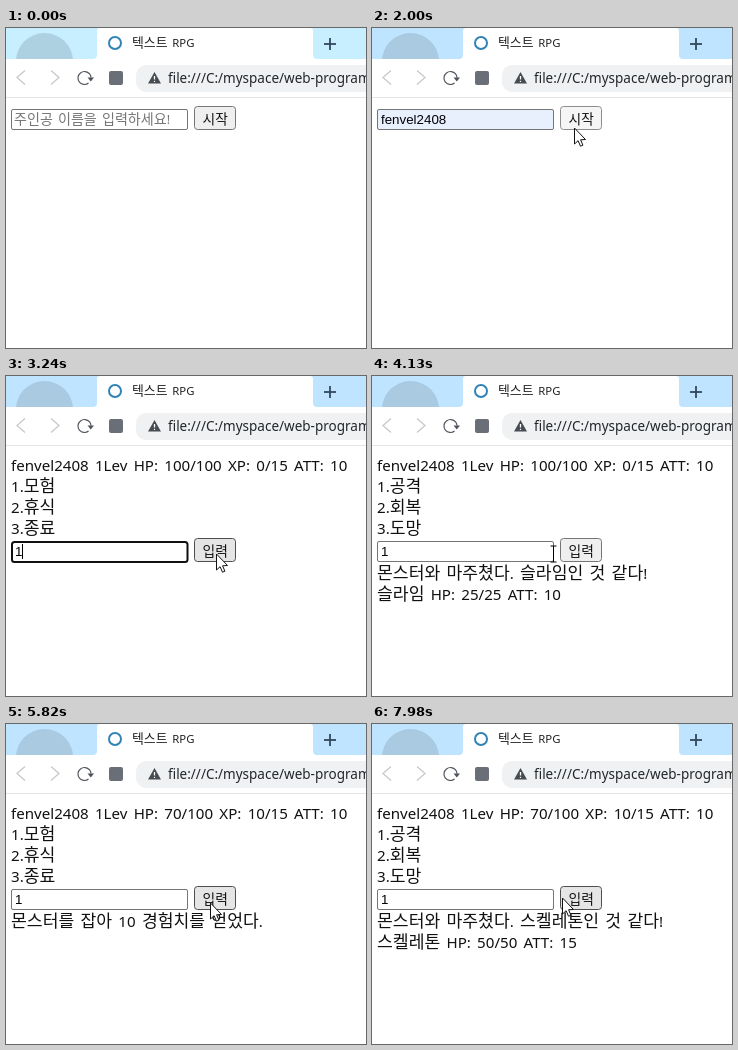
These frames come from a looping animation (360x320 px, 8000 ms). An HTML page with a canvas:

```html
<!DOCTYPE html>
<html lang="ko">
<head>
<meta charset="utf-8">
<title>텍스트 RPG</title>
<style>
  html, body { margin: 0; width: 100%; height: 100%; overflow: hidden; background: #fff; }
  canvas { display: block; }
</style>
</head>
<body>
<canvas id="stage" width="360" height="320"></canvas>
<script>
const ctx = document.getElementById('stage').getContext('2d');
const LOOP = 8000;
const HERO = 'fenvel2408';
const LATIN = '"Noto Sans", "Open Sans", sans-serif';
const KOREAN = '"Noto Sans CJK KR", "Noto Sans CJK JP", "Noto Sans CJK", sans-serif';
const FIELD_FONT = '13.33px "Liberation Sans", Arial, sans-serif';

// Pointer path: time, x, y
const PATH = [
  [210, 150, -20], [480, 95, 90], [700, 95, 90], [960, 91, 116],
  [1150, 100, 128], [1350, 100, 128], [1800, 203, 98], [1900, 202, 99],
  [2220, 202, 99], [2520, 120, 174], [2700, 120, 174], [2970, 216, 176],
  [3200, 210, 177], [3990, 210, 177], [4280, 150, 176], [4480, 150, 176],
  [4750, 204, 178], [7460, 204, 178], [7570, 165, 175], [7800, 165, 175],
  [7970, 190, 173]
];

// Mouse button: down, up
const CLICKS = [
  [480, 600], [1280, 1390], [1870, 2065], [2560, 2660], [3300, 3375],
  [4785, 4945], [5275, 5405], [5685, 5815], [6505, 6635]
];

const CAMP = ['1.모험', '2.휴식', '3.종료'];
const FIGHT = ['1.공격', '2.회복', '3.도망'];
const HIT = '10의 데미지를 주고, 10의 데미지를 받았다.';
const meet = name => `몬스터와 마주쳤다. ${name}인 것 같다!`;
const slime = hp => `슬라임 HP: ${hp}/25 ATT: 10`;

const STATES = [
  { at: 2065, hp: 100, xp: 0, menu: CAMP, log: [] },
  { at: 3375, hp: 100, xp: 0, menu: FIGHT, log: [meet('슬라임'), slime(25)] },
  { at: 4945, hp: 90, xp: 0, menu: FIGHT, log: [HIT, slime(15)] },
  { at: 5405, hp: 80, xp: 0, menu: FIGHT, log: [HIT, slime(5)] },
  { at: 5815, hp: 70, xp: 10, menu: CAMP, log: ['몬스터를 잡아 10 경험치를 얻었다.'] },
  { at: 6635, hp: 70, xp: 10, menu: FIGHT, log: [meet('스켈레톤'), '스켈레톤 HP: 50/50 ATT: 15'] }
];

const within = (t, a, b) => t >= a && t < b;

// Hangul, Latin and spaces are set as separate runs
function text(str, x, y, size, color = '#111') {
  ctx.fillStyle = color;
  for (const run of str.match(/[가-힣]+| |[^가-힣 ]+/g)) {
    if (run === ' ') {
      x += size * 0.39;
      continue;
    }
    const korean = /[가-힣]/.test(run);
    ctx.font = korean ? `${size * 1.075}px ${KOREAN}` : `${size * 0.945}px ${LATIN}`;
    ctx.fillText(run, x, y);
    x += ctx.measureText(run).width;
  }
}

function box(x, y, w, h, r, fill, stroke, line = 1) {
  ctx.beginPath();
  ctx.roundRect(x, y, w, h, r);
  if (fill) { ctx.fillStyle = fill; ctx.fill(); }
  if (stroke) { ctx.strokeStyle = stroke; ctx.lineWidth = line; ctx.stroke(); }
}

function lines(points, color, width) {
  ctx.beginPath();
  points.forEach(([x, y], i) => i ? ctx.lineTo(x, y) : ctx.moveTo(x, y));
  ctx.strokeStyle = color;
  ctx.lineWidth = width;
  ctx.stroke();
}

function polygon(points, fill) {
  ctx.beginPath();
  points.forEach(([x, y]) => ctx.lineTo(x, y));
  ctx.closePath();
  ctx.fillStyle = fill;
  ctx.fill();
}

function disc(x, y, r, fill) {
  ctx.beginPath();
  ctx.arc(x, y, r, 0, Math.PI * 2);
  ctx.fillStyle = fill;
  ctx.fill();
}

function drawBrowser(t) {
  ctx.fillStyle = '#fff';
  ctx.fillRect(0, 0, 360, 320);
  ctx.fillStyle = t < 70 ? '#c8efff' : '#bee4ff';
  ctx.fillRect(0, 0, 360, 31);

  ctx.save();
  ctx.beginPath();
  ctx.rect(0, 0, 360, 31);
  ctx.clip();
  disc(38.5, 33.5, 28.5, t < 70 ? '#aed1e1' : '#a9cae0');
  ctx.restore();

  // Active tab with flared feet
  ctx.beginPath();
  ctx.moveTo(87, 31);
  ctx.quadraticCurveTo(91, 31, 91, 27);
  ctx.lineTo(91, 3);
  ctx.quadraticCurveTo(91, 0, 94, 0);
  ctx.lineTo(304, 0);
  ctx.quadraticCurveTo(307, 0, 307, 3);
  ctx.lineTo(307, 27);
  ctx.quadraticCurveTo(307, 31, 311, 31);
  ctx.fillStyle = '#fff';
  ctx.fill();

  ctx.beginPath();
  ctx.arc(109, 15, 6, 0, Math.PI * 2);
  ctx.strokeStyle = '#2f83b7';
  ctx.lineWidth = 2;
  ctx.stroke();
  text('텍스트 RPG', 126, 19, 12, '#222');
  lines([[318, 16], [330, 16]], '#33475a', 1.8);
  lines([[324, 10], [324, 22]], '#33475a', 1.8);

  // Toolbar
  lines([[19, 42.5], [11, 49.5], [19, 56.5]], '#c4c7ca', 1.2);
  lines([[45, 42.5], [53, 49.5], [45, 56.5]], '#c4c7ca', 1.2);
  ctx.beginPath();
  ctx.arc(78.5, 50, 6.5, 0.9, Math.PI * 2 - 0.05);
  ctx.strokeStyle = '#50555c';
  ctx.lineWidth = 1.2;
  ctx.stroke();
  polygon([[81.5, 49.5], [88, 49.5], [84.8, 53.5]], '#50555c');
  box(103, 43, 14, 14, 2, '#6a6e76');

  box(130, 37, 260, 27, 10, '#eff1f3');
  polygon([[148.5, 44], [155, 55.5], [142, 55.5]], '#474b52');
  lines([[148.5, 48], [148.5, 51.5]], '#fff', 1.3);
  lines([[148.5, 52.8], [148.5, 54]], '#fff', 1.3);
  text('file:///C:/myspace/web-programming/', 162, 55, 14.3, '#22262b');
  ctx.fillStyle = '#e3e5e7';
  ctx.fillRect(0, 69, 360, 1);
}

function drawField(y, value, focused, filled, caretAtStart) {
  const fill = filled ? '#e8f0fe' : '#fff';
  if (focused) box(6, y + 1, 175.5, 20, 2.5, fill, '#101010', 2);
  else box(5.5, y + 0.5, 176, 20, 1.5, fill, '#767676');
  ctx.font = FIELD_FONT;
  ctx.fillStyle = '#000';
  ctx.fillText(value, 9, y + 15);
  if (focused) {
    const x = caretAtStart ? 9 : 9 + ctx.measureText(value).width;
    ctx.fillRect(Math.round(x), y + 3, 1, 15);
  }
}

function drawButton(y, label, p, down) {
  const over = p && within(p.x, 188, 230) && within(p.y, y, y + 24);
  const fill = !over ? '#efefef' : down ? '#f5f5f5' : '#e5e5e5';
  const edge = !over ? '#767676' : down ? '#8d8d8d' : '#4f4f4f';
  box(188.5, y + 0.5, 41, 23, 3, fill, edge);
  text(label, 196.5, y + 17.5, 12.8);
}

function drawPopup(t) {
  const alpha = Math.min((t - 560) / 80, (1480 - t) / 90, 1);
  if (alpha <= 0) return;
  ctx.save();
  ctx.globalAlpha = alpha;
  ctx.shadowColor = 'rgba(0,0,0,.28)';
  ctx.shadowBlur = 4;
  ctx.shadowOffsetY = 1;
  box(71, 110, 98, 45, 2, '#fff');
  ctx.shadowColor = 'transparent';
  polygon([[85, 111], [93, 103], [101, 111]], '#fff');
  lines([[85, 110.5], [93, 103], [101, 110.5]], '#dfe2e6', 0.8);
  if (t > 850) {
    ctx.fillStyle = '#e6e8e9';
    ctx.fillRect(71, 115, 98, 36);
  }
  text(HERO, 84, 138, 13, '#202124');
  ctx.restore();
}

function drawStart(t, p, down) {
  const focused = within(t, 490, 1870);
  const filled = t > 850;
  drawField(81, filled ? HERO : '', focused, filled, t < 1300);
  if (!filled) text('주인공 이름을 입력하세요!', 8, 96, 13.1, '#757575');
  drawButton(78, '시작', p, down);
  drawPopup(t);
}

function drawGame(t, p, down) {
  const s = STATES.filter(state => t >= state.at).pop();
  text(`${HERO} 1Lev HP: ${s.hp}/100 XP: ${s.xp}/15 ATT: 10`, 5, 95, 16);
  s.menu.forEach((item, i) => text(item, 5, 116 + i * 21, 16));
  drawField(165, t < 2760 ? '' : '1', within(t, 2570, 3300), false, false);
  drawButton(162, '입력', p, down);
  s.log.forEach((item, i) => text(item, 5, 203 + i * 21, 16));
}

function pointerAt(t) {
  if (t < PATH[0][0]) return null;
  const next = PATH.findIndex(k => k[0] > t);
  if (next < 0) {
    const [, x, y] = PATH[PATH.length - 1];
    return { x, y };
  }
  const [t0, x0, y0] = PATH[next - 1];
  const [t1, x1, y1] = PATH[next];
  const u = (t - t0) / (t1 - t0);
  const e = u * u * (3 - 2 * u);
  return { x: x0 + (x1 - x0) * e, y: y0 + (y1 - y0) * e };
}

function drawPointer(p, t, click) {
  const x = Math.round(p.x), y = Math.round(p.y);
  if (click && t - click[0] < 110) disc(x - 0.5, y - 0.5, 11.5, 'rgba(248,228,60,.75)');
  const top = t < 2065 ? 81 : 165;
  ctx.save();
  ctx.translate(x + 0.5, y + 1);
  if (within(x, 5, 182) && within(y, top, top + 21)) {
    lines([[0, -8], [0, 8]], '#000', 1);
    lines([[-3, -8], [3, -8]], '#000', 1);
    lines([[-3, 8], [3, 8]], '#000', 1);
  } else {
    polygon([[0, 0], [0, 16], [3.6, 12.7], [6, 18.2], [8.4, 17.2], [6.1, 11.8], [11, 11.5]], '#fff');
    ctx.strokeStyle = '#111';
    ctx.lineWidth = 1;
    ctx.stroke();
  }
  ctx.restore();
}

function render(t) {
  const p = pointerAt(t);
  const click = CLICKS.find(([a, b]) => within(t, a, b));
  drawBrowser(t);
  (t < STATES[0].at ? drawStart : drawGame)(t, p, !!click);
  if (p) drawPointer(p, t, click);
}

const begin = performance.now();
function tick() {
  render((performance.now() - begin) % LOOP);
  requestAnimationFrame(tick);
}
tick();
</script>
</body>
</html>
```
